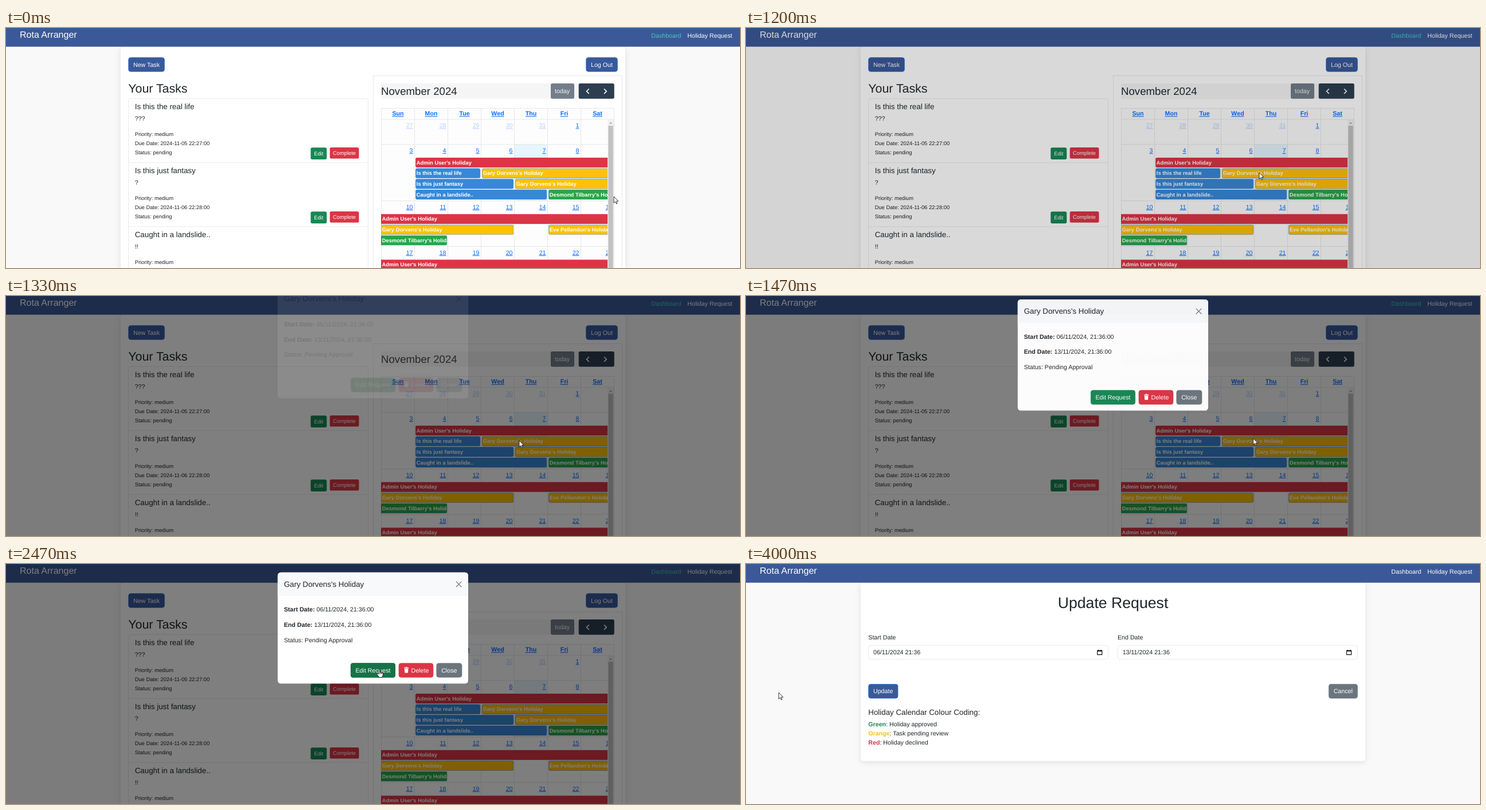
An HTML page for the animation above (5.2 s loop, 1280 by 420 pixels).

```html
<!DOCTYPE html>
<html lang="en">
<head>
<meta charset="utf-8">
<title>Holiday planner</title>
<style>
html, body { margin: 0; width: 100%; height: 100%; overflow: hidden; background: #f9f9f9; }
svg { display: block; }
text { font-family: "Liberation Sans", Arial, sans-serif; text-rendering: geometricPrecision; white-space: pre; }
.b { font-weight: bold; }
.u { text-decoration: underline; }
.card { filter: drop-shadow(0 2.7px 5.3px rgba(0, 0, 0, .1)); }
</style>
</head>
<body>
<svg id="stage" width="1280" height="420" viewBox="0 0 1280 420"></svg>
<script>
const INK = '#212529', NAVY = '#3b5998', BLUE = '#0d6efd', LINE = '#dee2e6', GRID = '#ddd';
const GREEN = '#198754', RED = '#dc3545', AMBER = '#ffc107', GREY = '#6c757d', EVENT = '#3788d8';
const BASE = 10.667, SMALL = 9.333, LARGE = 13.333;

const rect = (x, y, w, h, fill, r = 0, more = '') =>
  `<rect x="${x}" y="${y}" width="${w}" height="${h}" rx="${r}" fill="${fill}" ${more}/>`;
const text = (x, y, size, str, fill = INK, more = '') =>
  `<text x="${x}" y="${y}" font-size="${size}" fill="${fill}" ${more}>${str}</text>`;
const path = (d, more) => `<path d="${d}" ${more}/>`;
const stroke = (color, width = .67) => `stroke="${color}" stroke-width="${width}"`;
const group = (id, body) => `<g id="${id}">${body}</g>`;
const button = (x, y, w, label, fill, border = fill) =>
  rect(x + .33, y + .33, w - .67, 24.7, fill, 4, stroke(border)) +
  text(x + 8.67, y + 16.3, BASE, label, '#fff');
const card = h => rect(200, 32.7, 880, h, '#fff', 5.3, 'class="card"');

function task(i, title, note, due) {
  const y = 123.5 + 112 * i;
  return (i ? path(`M213.5 ${y}h418`, stroke(LINE)) : '') +
    text(224.7, y + 18.5, LARGE, title) +
    text(224.7, y + 38.5, BASE, note) +
    ['Priority: medium', 'Due Date: ' + due, 'Status: pending']
      .map((s, k) => text(224.7, y + 65 + 16 * k, SMALL, s)).join('') +
    rect(531.3, y + 85.8, 28, 20.7, GREEN, 2.7) + text(537.2, y + 99.2, SMALL, 'Edit', '#fff') +
    rect(564.7, y + 85.5, 50.8, 19.6, RED, 2.7) + text(570, y + 98.7, SMALL, 'Complete', '#fff');
}

// A bar is clipped to [x, end]; open sides run past the clip.
function bar(x, end, y, label, fill, border = fill) {
  const left = x < 655 ? -6 : .33, right = end > 1048 ? end - x + 6 : end - x - .33;
  return `<svg x="${x}" y="${y}" width="${end - x}" height="17.6">` +
    rect(left, .33, right - left, 16.9, fill, 2.7, stroke(border)) +
    text(1.8, 11.9, SMALL, label, '#fff', 'class="b"') + '</svg>';
}

function calendar() {
  const X = 654.5, END = 1049.3, STEP = 58, tops = [160, 203.7, 302.5, 382.3];
  const lane = (row, k) => tops[row] + 23 + 18.67 * k;
  const admin = "Admin User's Holiday", gary = "Gary Dorvens's Holiday",
    desmond = "Desmond Tilbarry's Holiday", eve = "Eve Pellandon's Holiday";
  let s = rect(640.5, 83.5, 434, 400, '#fff', 0, stroke(GRID)) +
    rect(654, 97, 406.7, 27, '#f5f5f5') + text(654, 117, 18.667, 'November 2024') +
    rect(950, 97, 41, 26.7, '#727e8a', 2.7) + text(957, 114.3, BASE, 'today', '#f4f5f6') +
    rect(998.7, 97, 62, 26.7, '#2c3e50', 2.7) +
    path('M1016.7 106.5l-4.2 4.2l4.2 4.2M1043 106.5l4.2 4.2l-4.2 4.2', 'fill="none" ' + stroke('#fff', 1.6)) +
    rect(X, 140.5, 406, 300, '#fdfdfd', 0, stroke(GRID)) +
    rect(886.5, 203.7, STEP, 98.8, '#e6f5fe') +
    rect(828.5, 203.7, STEP, 98.8, '#eeeeee', 0, 'id="hover"');
  for (let i = 1; i < 7; i++) s += path(`M${X + STEP * i} 140.5V420`, stroke(GRID));
  for (const y of tops) s += path(`M${X} ${y}H1060.5`, stroke(GRID));
  ['Sun', 'Mon', 'Tue', 'Wed', 'Thu', 'Fri', 'Sat'].forEach((d, i) =>
    s += text(X + STEP * (i + .5), 153.3, BASE, d, BLUE, 'class="b u" text-anchor="middle"'));
  for (let i = 0; i < 28; i++) {
    const old = i < 5;
    s += text(X + STEP * (i % 7 + 1) - 3, tops[i / 7 | 0] + 14.4, BASE, old ? 27 + i : i - 4, BLUE,
      `class="u" text-anchor="end" opacity="${old ? .3 : 1}"`);
  }
  return s +
    bar(714, END, lane(1, 0), admin, RED) +
    bar(714, 827.3, lane(1, 1), 'Is this the real life', EVENT) +
    bar(830, END, lane(1, 1), gary, AMBER, EVENT) +
    bar(714, 885.3, lane(1, 2), 'Is this just fantasy', EVENT) +
    bar(888, END, lane(1, 2), gary, AMBER, EVENT) +
    bar(714, 943.3, lane(1, 3), 'Caught in a landslide..', EVENT) +
    bar(946, END, lane(1, 3), desmond, '#28a745', EVENT) +
    bar(654, END, lane(2, 0), admin, RED) +
    bar(654, 885.3, lane(2, 1), gary, AMBER, EVENT) +
    bar(946, END, lane(2, 1), eve, AMBER, EVENT) +
    bar(654, 769.3, lane(2, 2), desmond, '#28a745', EVENT) +
    bar(654, END, lane(3, 0), admin, RED) +
    rect(END, 160.3, 10.9, 260, '#f1f1f1') + rect(1050.3, 171, 8.4, 250, '#c1c1c1') +
    path('M1052 167.5h5l-2.5-2.8z', 'fill="#a3a3a3"');
}

const dashboard = () => card(420) +
  button(213.3, 51.3, 63.4, 'New Task', NAVY, BLUE) +
  button(1011.3, 51.3, 55.4, 'Log Out', NAVY, BLUE) +
  text(213.3, 112.7, 21.333, 'Your Tasks') +
  rect(213.6, 123.5, 418, 400, '#fff', 4, stroke(LINE)) +
  task(0, 'Is this the real life', '???', '2024-11-05 22:27:00') +
  task(1, 'Is this just fantasy', '?', '2024-11-06 22:28:00') +
  task(2, 'Caught in a landslide..', '!!', '2024-11-07 22:28:00') +
  calendar();

const dateField = (x, label, value) =>
  text(x, 132, BASE, label) + rect(x + .33, 142.3, 418, 24.7, '#fff', 4, stroke(LINE)) +
  text(x + 8.67, 158.3, BASE, value) +
  path(`M${x + 399.5} 151.5h8v7.2h-8zM${x + 399.5} 152.3h8M${x + 401.2} 150v1.5M${x + 405.8} 150v1.5`,
    'fill="none" ' + stroke('#111', 1.2));

const updatePage = () => card(312) +
  text(640, 76.7, 26.667, 'Update Request', INK, 'text-anchor="middle"') +
  dateField(213.3, 'Start Date', '06/11/2024 21:36') +
  dateField(648, 'End Date', '13/11/2024 21:36') +
  button(213.3, 210, 52, 'Update', NAVY, BLUE) +
  button(1016, 210, 50.7, 'Cancel', GREY) +
  text(213.3, 264, LARGE, 'Holiday Calendar Colour Coding:') +
  [['Green', 'Holiday approved', GREEN], ['Orange', 'Task pending review', AMBER], ['Red', 'Holiday declined', RED]]
    .map(([name, use, color], i) => text(213.3, 284 + 16 * i, BASE,
      `<tspan class="b" fill="${color}">${name}</tspan>: ${use}`)).join('');

const nav = () => rect(0, 0, 1280, 32.7, NAVY) +
  text(24, 16.7, 16, 'Rota Arranger', '#fff') +
  text(1125.3, 17.3, BASE, 'Dashboard', '#fff', 'id="home"') +
  text(1188.3, 17.3, BASE, 'Holiday Request', '#fff');

const dateLine = (y, label, value) =>
  text(484.7, y, BASE, `<tspan class="b">${label}:</tspan> ${value}`);

const modalBox = () =>
  rect(473.8, 14.7, 332.2, 194.6, '#fff', 5.3) +
  path('M473.8 56V20a5.3 5.3 0 0 1 5.3-5.3h321.6a5.3 5.3 0 0 1 5.3 5.3V56z', 'fill="#f8f9fa"') +
  text(484.7, 39.7, LARGE, "Gary Dorvens's Holiday") +
  path('M784.8 30.6l9.6 9.6m0-9.6l-9.6 9.6', stroke('#7c7d7e', 1.3)) +
  dateLine(83.3, 'Start Date', '06/11/2024, 21:36:00') +
  dateLine(110, 'End Date', '13/11/2024, 21:36:00') +
  text(484.7, 136.7, BASE, 'Status: Pending Approval') +
  button(601, 173.3, 78, '', GREEN) + rect(601, 173.3, 78, 25.4, '#157347', 4, 'id="editHover"') +
  text(609.5, 189.6, BASE, 'Edit Request', '#fff') +
  button(684.7, 173.3, 60.6, '', RED) + rect(684.7, 173.3, 60.6, 25.4, '#bb2d3b', 4, 'id="deleteHover"') +
  path('M694 181.2h8.3v1.2h-8.3zM696.7 180.2h3v1h-3zM694.8 183.2h6.7l-.5 7.3h-5.7z', 'fill="#fff"') +
  text(706.5, 189.6, BASE, 'Delete', '#fff') +
  button(750.5, 173.3, 44.8, 'Close', GREY);

const outline = 'fill="#fff" stroke-linejoin="round" ' + stroke('#000', .8);
const pointer = () =>
  path('M0 0V11.2L2.6 8.8L4.3 12.7L6 12L4.3 8.1H7.8Z', outline + ' id="arrow"') +
  path('M-1 8.5V1Q-1 0 0 0T1 1V5Q2 4.2 3 5.3Q4 4.8 4.7 5.8Q6.2 5.4 6.5 7V9.5Q6.2 11.5 5 13V14H-.5V13' +
    'L-4 9Q-4.6 8 -3.8 7.4Q-2.8 7 -1 8.5ZM1 5V8M3 5.5V8M4.7 6V8', outline + ' id="hand"');

document.getElementById('stage').innerHTML =
  rect(0, 0, 1280, 420, '#f9f9f9') + group('board', dashboard()) + group('update', updatePage()) + nav() +
  rect(0, 0, 1280, 420, '#000', 0, 'id="shade"') + group('modal', modalBox()) + group('cursor', pointer());

const part = {};
document.querySelectorAll('[id]').forEach(e => part[e.id] = e);
const show = (id, on) => part[id].setAttribute('opacity', +on);
const clamp = v => Math.max(0, Math.min(1, v));

const easeIn = u => u * u, easeOut = u => 1 - (1 - u) ** 2, easeBoth = u => u * u * (3 - 2 * u);
// Pointer stops: time, x, y, easing on the way there
const stops = [
  [0, 1060, 295], [533, 900, 257, easeBoth], [800, 900, 257, easeBoth], [1067, 895, 253, easeBoth],
  [1333, 895, 253, easeBoth], [1867, 728, 191, easeIn], [2400, 651, 184.5, easeOut],
  [3600, 651, 184.5, easeBoth], [4000, 57, 225, easeBoth], [5200, 57, 225, easeBoth]
];

function pointerAt(t) {
  const i = stops.findIndex(s => s[0] > t), [t0, x0, y0] = stops[i - 1], [t1, x1, y1, ease] = stops[i];
  const u = ease((t - t0) / (t1 - t0));
  return [x0 + (x1 - x0) * u, y0 + (y1 - y0) * u];
}

const LOOP = 5200, FPS = 15, OPEN = 1155, SLIDE = 1320, SUBMIT = 3460;

function draw() {
  const t = Math.floor((performance.now() + 4) % LOOP * FPS / 1000) * 1000 / FPS;
  const [x, y] = pointerAt(t);
  const updated = t > SUBMIT, open = t > OPEN && !updated;
  const onEvent = t < OPEN && x < 1047;
  const onButtons = open && t > 1800 && y > 173 && y < 198.7;
  const onDelete = onButtons && x > 684.7 && x < 745.3;
  const onEdit = onButtons ? clamp((679 - x) / 20) : 0;

  show('board', !updated);
  show('update', updated);
  part.home.setAttribute('fill', updated ? '#fff' : '#45c8c0');
  show('hover', onEvent && x < 944);
  show('shade', open ? .5 * clamp((t - OPEN) / 150) : 0);
  show('modal', open ? clamp((t - SLIDE) / 150) : 0);
  part.modal.setAttribute('transform', `translate(0 ${-33.3 * (1 - easeOut(clamp((t - SLIDE) / 300)))})`);
  show('editHover', onEdit);
  show('deleteHover', onDelete);

  const hand = onEvent || (t < 3390 && (onDelete || onEdit > 0));
  show('hand', hand);
  show('arrow', !hand);
  part.cursor.setAttribute('transform', `translate(${x} ${y})`);
  requestAnimationFrame(draw);
}
draw();
</script>
</body>
</html>
```
